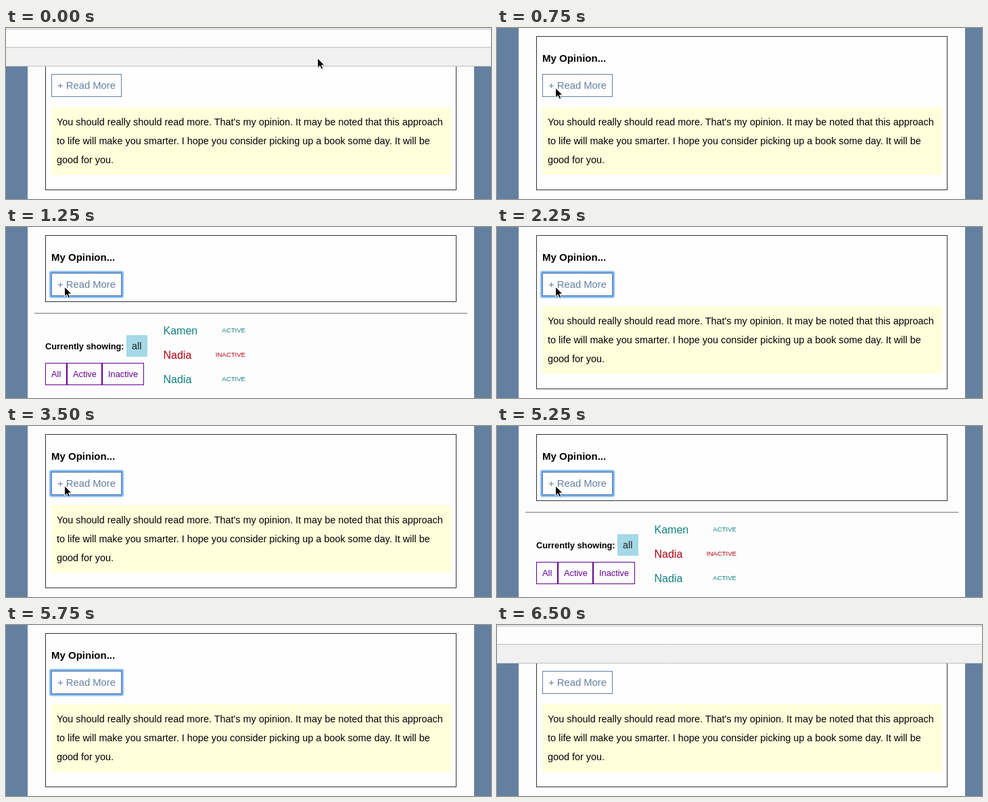
An HTML page for the animation above (6750 ms loop, 717 px wide and 253 px high).

```html
<!DOCTYPE html>
<html lang="en">
<head>
<meta charset="utf-8">
<title>Read more toggle</title>
<style>
  html, body { margin: 0; width: 100%; height: 100%; overflow: hidden; background: #6480a0; }
  svg { display: block; width: 717px; height: 253px; font-family: "Liberation Sans", Arial, sans-serif; }
  text { white-space: pre; }
  .bold { font-weight: bold; }
  .body { font-size: 14.4px; fill: #000; }
  .name { font-size: 16px; }
  .state { font-size: 9.6px; text-anchor: end; }
  .on { fill: #10807e; }
  .off { fill: #b00010; }
  .tab rect { fill: none; stroke: #660091; }
  .tab text { font-size: 12.8px; fill: #660091; }
</style>
</head>
<body>
<svg viewBox="0 0 717 253">
  <rect width="717" height="253" fill="#6480a0"/>
  <rect x="32" width="660" height="253" fill="#fdfdfd"/>
  <rect id="box" x="58.5" y="12.5" width="607" height="227" fill="#fefefe" stroke="#333"/>
  <text class="bold" x="67" y="50" font-size="15">My Opinion...</text>

  <g id="ring" fill="none">
    <rect x="65.5" y="66.5" width="107" height="37" rx="2" stroke="#b4d5f8" stroke-width="4"/>
    <rect x="66" y="67" width="106" height="36" rx="1" stroke="#6daaee" stroke-width="2"/>
  </g>
  <rect x="67.5" y="68.5" width="103" height="33" fill="#fefefe" stroke="#6480a0"/>
  <text x="76" y="90" font-size="14.8" fill="#6480a0">+ Read More</text>

  <g id="more" class="body">
    <rect x="67" y="117" width="591" height="100" rx="2" fill="#ffffdc"/>
    <text x="75" y="144">You should really should read more. That's my opinion. It may be noted that this approach</text>
    <text x="75" y="172">to life will make you smarter. I hope you consider picking up a book some day. It will be</text>
    <text x="75" y="200">good for you.</text>
  </g>

  <g id="list">
    <rect x="42" y="127" width="640" height="1" fill="#8c8c8c"/>
    <rect x="42" y="128" width="640" height="1" fill="#dcdcdc"/>
    <text class="bold" x="58" y="181" font-size="12.8">Currently showing:</text>
    <rect x="178" y="160" width="31" height="32" fill="#a5d9e7"/>
    <text x="186" y="181" font-size="14.4" fill="#222">all</text>
  </g>

  <g id="bar">
    <rect width="717" height="57" fill="#fdfdfd"/>
    <rect y="29" width="717" height="27" fill="#f0f0f0"/>
    <path d="M0 1.5H717M0 28.5H717M0 56.5H717" stroke="#c0c0c0"/>
  </g>

  <g id="cursor">
    <path d="M1 2V16.5l3.4-3 2.3 5 2.5-1.1-2.2-4.9H11.5Z" fill="#000" opacity=".18"/>
    <path d="M.5 .5V15l3.4-3.1 2.3 5 2.5-1.1L6.5 11H11Z" fill="#000" stroke="#fff" stroke-width="1"/>
  </g>
</svg>
<script>
  const LOOP = 6750;
  const $ = id => document.getElementById(id);
  const [box, ring, more, list, bar, cursor] =
    ["box", "ring", "more", "list", "bar", "cursor"].map($);

  function add(parent, tag, attrs, label = "") {
    const el = document.createElementNS("http://www.w3.org/2000/svg", tag);
    for (const key in attrs) el.setAttribute(key, attrs[key]);
    el.textContent = label;
    return parent.appendChild(el);
  }

  [["All", 58, 32], ["Active", 90, 52], ["Inactive", 142, 62]].forEach(([label, x, w]) => {
    const tab = add(list, "g", { class: "tab" });
    add(tab, "rect", { x: x + .5, y: 201.5, width: w - 1, height: 32 });
    add(tab, "text", { x: x + 9, y: 222 }, label);
  });

  [["Kamen", true], ["Nadia", false], ["Nadia", true]].forEach(([name, active], i) => {
    const tone = active ? "on" : "off", y = 159 + i * 36;
    add(list, "text", { class: "name " + tone, x: 232.5, y }, name);
    add(list, "text", { class: "state " + tone, x: 354, y: y - 3 }, active ? "ACTIVE" : "INACTIVE");
  });

  // Each track is [start time, value], held until the next entry.
  const tracks = {
    open: [[0, true], [1250, false], [2250, true], [3000, false], [3500, true], [5250, false], [5500, true]],
    focus: [[0, false], [1250, true], [6500, false]],
    barY: [[0, 0], [500, -60], [6000, -32], [6250, 0]],
    pointer: [[0, [460, 44]], [250, [332, 96]], [500, [303, 110]], [750, [86, 88]], [5750, null]]
  };
  const at = (track, t) => track.findLast(([start]) => start <= t)[1];
  const show = (el, on) => el.setAttribute("visibility", on ? "visible" : "hidden");

  function draw(t) {
    const open = at(tracks.open, t), pointer = at(tracks.pointer, t);
    box.setAttribute("height", open ? 227 : 98);
    show(more, open);
    show(list, !open);
    show(ring, at(tracks.focus, t));
    bar.setAttribute("transform", `translate(0 ${at(tracks.barY, t)})`);
    show(cursor, pointer);
    if (pointer) cursor.setAttribute("transform", `translate(${pointer})`);
  }

  const start = performance.now();
  function tick() {
    draw((performance.now() - start) % LOOP);
    requestAnimationFrame(tick);
  }
  tick();
</script>
</body>
</html>
```
